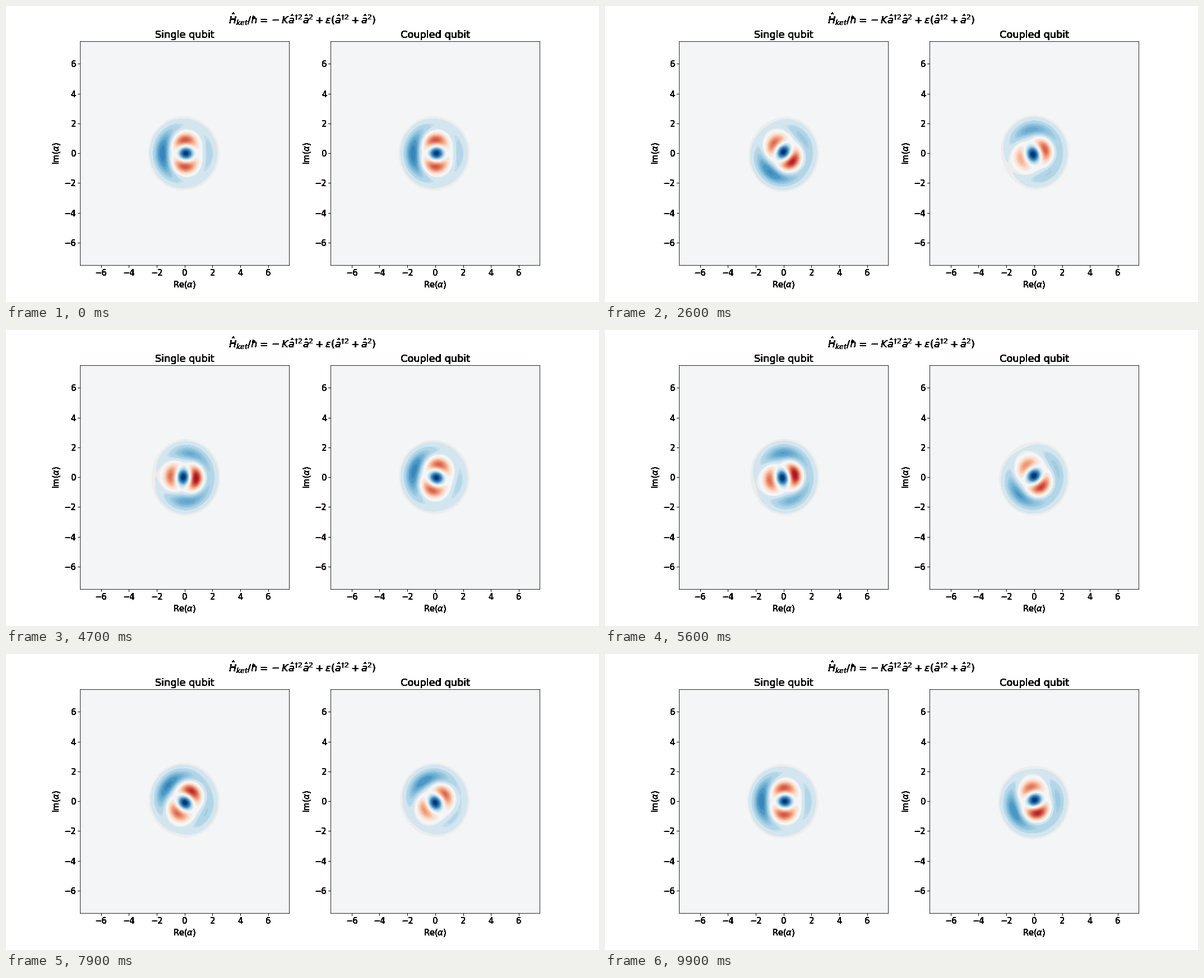
These frames come from a looping animation (1058 px wide and 529 px high, 10 s). A matplotlib script:

```python
import numpy as np
import matplotlib.pyplot as plt
from matplotlib.animation import FuncAnimation

FRAMES, STEP = 100, 100
REACH = 3.0        # half-width of the computed part of phase space
PEAK = 0.93        # value shown in the darkest blue
P1, R01, R12 = 0.05, 0.0774, 0.2037   # one-photon weight, dipole coherences

plt.rcParams.update({"font.family": "DejaVu Sans", "font.size": 14,
                     "mathtext.fontset": "dejavusans"})


def banded_map():
    """RdBu reduced to coarse colour cells, each shown as its mean."""
    rgb = np.round(plt.get_cmap("RdBu")(np.arange(256))[:, :3] * 255).astype(int)
    cell = (rgb[:, 0] // 32) * 1000 + (rgb[:, 1] // 16) * 10 + rgb[:, 2] // 32
    lut = np.zeros((256, 3), np.uint8)
    for key in np.unique(cell):
        lut[cell == key] = rgb[cell == key].mean(axis=0)
    lut[cell == cell[130]] = rgb[130]
    return lut


LUT = banded_map()
X, Y = np.meshgrid(np.linspace(-REACH, REACH, 300), np.linspace(-REACH, REACH, 320))
R, TH = np.hypot(X, Y), np.arctan2(Y, X)
R2 = R * R


def wigner(p0, q, phase, tilt):
    """Wigner function of a state with 0, 1 and 2 photons.

    p0: vacuum weight, q: 0-2 coherence, phase: its angle,
    tilt: angle of the 0-1 coherence.
    """
    p2 = 1 - P1 - p0
    w = p0 + P1 * (2 * R2 - 1) + p2 * (1 - 4 * R2 + 2 * R2**2)
    w += 2 * np.sqrt(2) * q * R2 * np.cos(2 * TH - phase)
    w -= 2 * np.sqrt(2) * R01 * R * np.cos(TH - tilt)
    w -= 4 * R12 * R * (R2 - 1) * np.cos(TH - phase + tilt)
    return w * np.exp(-R2)


def paint(w):
    level = np.clip((0.5 + 0.5 * w / PEAK) * 256, 0, 255).astype(int)
    return LUT[level]


def smooth(t, ts, vs):
    """Cubic Hermite curve through a few points."""
    ts, vs = np.asarray(ts), np.asarray(vs)
    slope = np.gradient(vs, ts)
    k = int(np.clip(np.searchsorted(ts, t, "right") - 1, 0, len(ts) - 2))
    h = ts[k + 1] - ts[k]
    u = (t - ts[k]) / h
    return ((1 + 2 * u) * (1 - u)**2 * vs[k] + u * (1 - u)**2 * h * slope[k]
            + u * u * (3 - 2 * u) * vs[k + 1] + u * u * (u - 1) * h * slope[k + 1])


TIMES = [0, 1.3, 2.6, 4.7, 6.5, 7.9, 9.9]
AXIS = [0.0, 49, 109, 164, 270, 305, 377]          # lobe axis, degrees
VACUUM = [0.12, 0.18, 0.23, 0.15, 0.21, 0.21, 0.12]
COHERENCE = [0.30, 0.27, 0.23, 0.29, 0.25, 0.25, 0.31]


def single(t):
    phase = 2 * np.pi * t / 9.9
    return wigner(0.12, 0.32 - 0.02 * np.cos(phase), phase, 0)


def coupled(t):
    axis = np.radians(smooth(t, TIMES, AXIS))
    return wigner(smooth(t, TIMES, VACUUM), smooth(t, TIMES, COHERENCE),
                  2 * axis, np.radians(-3.5 * t))


def crisp(img, dpi):
    """Hard-edged black lettering and ticks."""
    out = img.copy()
    out[..., 3] = img[..., 3] > 0.1
    return out, 0, 0


fig, axes = plt.subplots(1, 2, figsize=(14, 7), dpi=529 / 7, facecolor="white")
fig.subplots_adjust(left=0.125, right=0.9, bottom=0.125, top=0.88, wspace=0.2)
heading = fig.suptitle(r"$\hat{H}_{ket}/\hbar = -K\hat{a}^{\dagger 2}\hat{a}^2"
                       r" + \varepsilon(\hat{a}^{\dagger 2} + \hat{a}^2)$",
                       y=0.98, fontsize="large")
heading.set_agg_filter(crisp)

panels = []
for ax, name, state in zip(axes, ("Single qubit", "Coupled qubit"), (single, coupled)):
    image = ax.imshow(paint(state(0)), origin="lower", aspect="auto",
                      extent=(-REACH, REACH, -REACH, REACH), interpolation="nearest")
    ax.set(xlim=(-7.5, 7.5), ylim=(-7.5, 7.5), facecolor=LUT[130] / 255,
           xticks=range(-6, 7, 2), yticks=range(-6, 7, 2))
    ax.set_xlabel(r"$\mathrm{Re}(\alpha)$")
    ax.set_ylabel(r"$\mathrm{Im}(\alpha)$")
    ax.set_title(name)
    for part in (ax.title, ax.xaxis, ax.yaxis):
        part.set_agg_filter(crisp)
    panels.append((image, state))


def update(i):
    for image, state in panels:
        image.set_data(paint(state(i * STEP / 1000)))
    return [image for image, _ in panels]


anim = FuncAnimation(fig, update, frames=FRAMES, interval=STEP, repeat=True,
                     repeat_delay=0, blit=False)
plt.show()
```
